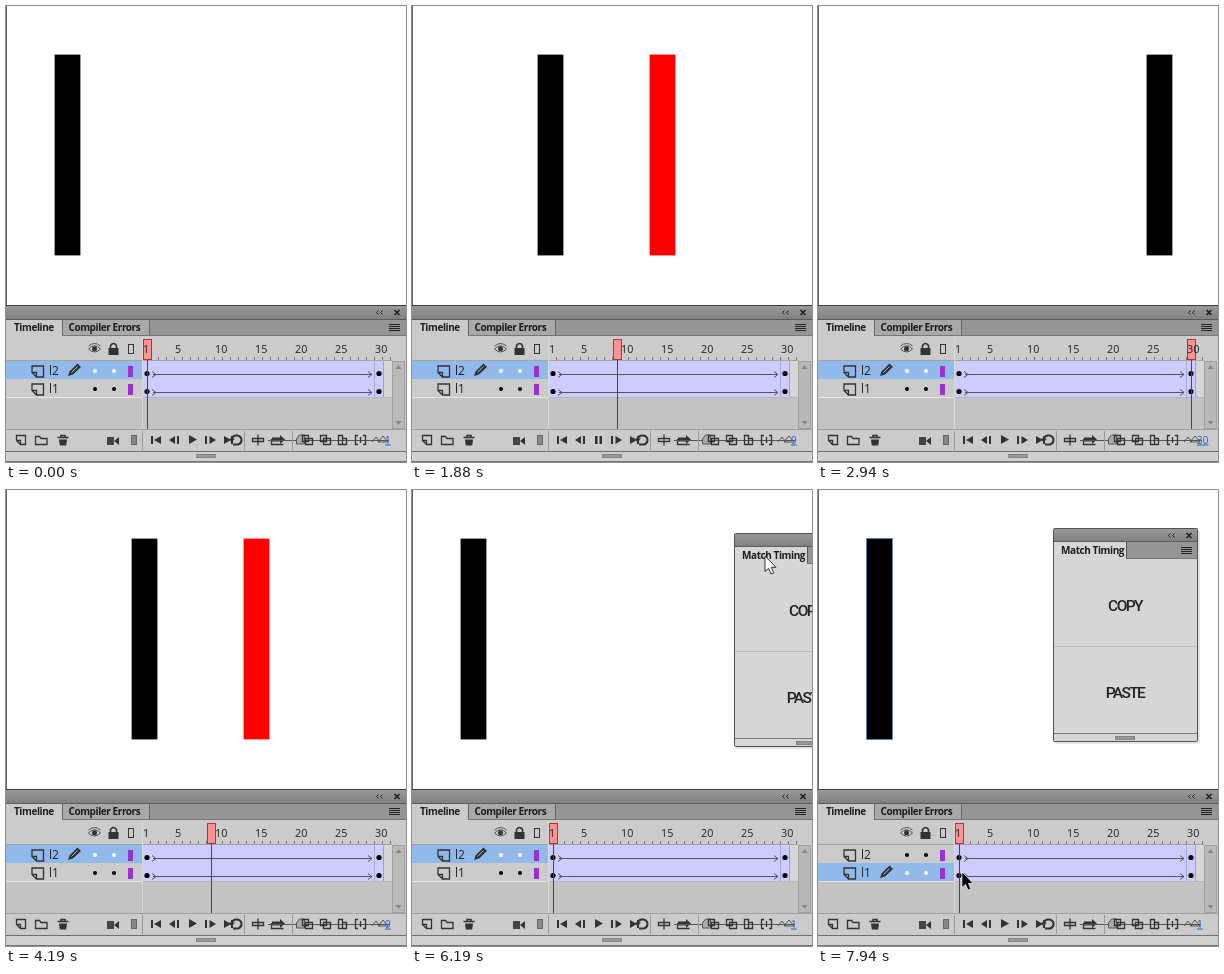
Recreate the animation shown at these times as an HTML page. Size 400 by 456 pixels, loop 8000 ms.

```html
<!DOCTYPE html>
<html lang="en">
<head>
<meta charset="utf-8">
<title>Timeline playback</title>
<style>
html, body { margin: 0; width: 100%; height: 100%; overflow: hidden; background: #fff; }
svg { display: block; width: 400px; height: 456px; }
text { font-family: "Open Sans", "Noto Sans", sans-serif; fill: #2c2c2c; }
.tab { font-size: 10px; font-weight: 700; letter-spacing: -.42px; fill: #1c1c1c; }
.num { font-family: "Noto Sans", sans-serif; font-size: 10.8px; }
.name { font-size: 12px; fill: #222; }
.fps { font-size: 10px; fill: #1668d8; text-decoration: underline; }
.big { font-family: Roboto, sans-serif; font-size: 15.5px; font-weight: 500; letter-spacing: -1.6px; text-anchor: middle; fill: #222; }
.ico { fill: none; stroke: #333; stroke-width: 1.3; }
.thin { fill: none; stroke: #555; stroke-width: 1; }
.solid { fill: #333; }
</style>
</head>
<body>
<svg id="stage" viewBox="0 0 400 456" xmlns="http://www.w3.org/2000/svg"></svg>
<script>
const LOOP = 8000, STEP = 62.5;
const ROWS = [355, 373];

const rect = (x, y, w, h, fill, more = '') =>
  `<rect x="${x}" y="${y}" width="${w}" height="${h}" fill="${fill}" ${more}/>`;
const path = (d, cls = 'ico', more = '') => `<path class="${cls}" d="${d}" ${more}/>`;
const dot = (x, y, r, fill = '#000', more = '') =>
  `<circle cx="${x}" cy="${y}" r="${r}" fill="${fill}" ${more}/>`;
const text = (x, y, cls, s, more = '') => `<text x="${x}" y="${y}" class="${cls}" ${more}>${s}</text>`;
const frameX = n => 141 + 8 * (n - 1);

// Collapse arrows, close cross and menu lines shared by both panels
const panelMarks = (right, top) =>
  path(`M${right - 27.5} ${top + 4.5}l-2 2 2 2M${right - 23.5} ${top + 4.5}l-2 2 2 2`, 'thin', 'style="stroke:#222"') +
  path(`M${right - 11.5} ${top + 4}l5 5m0 -5l-5 5`, 'ico', 'style="stroke:#222;stroke-width:1.7"') +
  [0, 2, 4, 6].map(d => rect(right - 17, top + 18 + d, 11, 1, '#222')).join('');

const grip = (x, y) => rect(x + .5, y + .5, 19, 3, '#999', 'stroke="#858585"');

function panelChrome() {
  return rect(0, 299, 400, 157, '#cbcbcb') +
    rect(0, 299, 400, 1, '#3c3c3c') +
    rect(0, 300, 400, 13, 'url(#bar)') +
    rect(0, 313, 400, 17, '#959595') + rect(0, 313, 400, 1, '#5c5c5c') +
    rect(57, 314, 86, 15, '#a9a9a9') + rect(143, 314, 1, 15, '#666') +
    rect(0, 329, 400, 1, '#777') +
    rect(0, 314, 56, 16, '#cbcbcb') + rect(56, 314, 1, 15, '#666') +
    text(8, 325, 'tab', 'Timeline') + text(62.5, 325, 'tab', 'Compiler Errors') +
    panelMarks(400, 300);
}

const columnIcons = path('M82.5 343q6 -6.5 12 0q-6 6 -12 0z', 'thin') + dot(88.5, 342.7, 2.5, '#333') +
  path('M82.5 340q6 -5 12 0', 'thin') +
  rect(102.5, 342, 10, 7, '#333') + path('M104.5 342v-2.5q3 -4 6 0v2.5', 'ico', 'style="stroke-width:1.6"') +
  rect(122.5, 338.5, 5, 9, 'none', 'stroke="#333"');

function ticks() {
  let s = '';
  for (let n = 1; n <= 31; n++) s += rect(frameX(n) + 3, 351, 1, 3, '#777');
  return s;
}

const labels = () => [1, 5, 10, 15, 20, 25, 30]
  .map(n => text(frameX(n) - 4, 347.3, 'num', n)).join('');

function layerRow(i) {
  const y = ROWS[i], line = y + 13.5, key = y + 12.5;
  return `<g id="row${i}">` + rect(0, y, 136, 18, '#cbcbcb', 'class="bg"') +
    path(`M26 ${y + 5}h11.5v11h-7l-4.5 -4.5zM26 ${y + 11.5}h4.5v4.5`) +
    text(43, y + 14, 'name', 'l' + (2 - i)) +
    `<g class="pen">` + path(`M62 ${y + 15}l1.5 -4.5 8 -8 3.5 3.5 -8 7.5z`, 'solid') +
    path(`M65.5 ${y + 11.5}l6 -6`, 'thin', 'style="stroke:#9bb8da"') + `</g>` +
    dot(89, y + 10, 2, '#000', 'class="mark"') + dot(108, y + 10, 2, '#000', 'class="mark"') +
    rect(122, y + 5, 5, 11, '#9a32cd') + `</g>` +
    rect(0, y + 18, 137, 1, '#e6e6e6') +
    rect(137, y, 241, 18, '#ccccff') + rect(137, y + 18, 249, 1, '#b4b4c8') +
    rect(378, y, 8, 18, '#d6d6d6') +
    rect(368, y, 1, 18, '#a8a8dc') + rect(377, y, 1, 18, '#a0a0c8') +
    path(`M147 ${line}H366M146 ${line - 3}l4 3 -4 3M362 ${line - 3}l4 3 -4 3`, 'thin') +
    dot(141, key, 2.6) + dot(373, key, 2.6);
}

function grid() {
  return rect(0, 354, 386, 1, '#a4a4a4') +
    rect(0, 392, 386, 31, '#c3c3c3') + layerRow(0) + layerRow(1) +
    rect(136, 331, 1, 92, '#d8d8d8') +
    rect(386.5, 355.5, 12, 67, '#b9b9b9', 'stroke="#a0a0a0"') +
    path('M389.5 363l3 -4 3 4zM389.5 415l3 4 3 -4z', '', 'fill="#888"') +
    rect(0, 423, 400, 1, '#a0a0a0');
}

function toolbar() {
  return rect(0, 424, 400, 21, '#cbcbcb') +
    path('M10.5 429.5h9v9h-5l-4 -4zM10.5 434.5h4v4') +
    path('M29.5 438.5v-8h4l1.5 2h6v6z') +
    path('M51.5 431.5h11M55 431v-1.5h4v1.5', 'ico', 'style="stroke-width:1.6"') +
    path('M53 433.5h8l-.8 6h-6.4z', 'solid') +
    rect(101, 431, 7, 8, '#444') + path('M108 435l5 -4v8z', 'solid') +
    rect(125.5, 429.5, 5, 9, '#888', 'stroke="#666"') +
    rect(136, 425, 1, 19, '#999') +
    rect(145, 430, 2, 8, '#333') + path('M155 430v8l-7 -4z', 'solid') +
    path('M169 430v8l-6 -4z', 'solid') + rect(171, 430, 2, 8, '#333') +
    `<g id="play">` + path('M183 429v9l8 -4.5z', 'solid') + `</g>` +
    `<g id="pause">` + rect(183, 430, 2.5, 8, '#333') + rect(187.5, 430, 2.5, 8, '#333') + `</g>` +
    rect(199, 430, 2, 8, '#333') + path('M203.5 430v8l6.5 -4z', 'solid') +
    path('M218 430v8l7 -4z', 'solid') + rect(225, 430, 2, 8, '#333') +
    path('M227 438.5h5q3.5 -1 3.5 -4.5t-4 -4.5h-2q-4 1 -4 5', 'ico', 'style="stroke-width:2"') +
    path('M223 432.5l2.5 4 3.5 -4z', 'solid') +
    rect(238, 425, 1, 19, '#999') +
    path('M252 428.5v11M246.5 432.5h11v3h-11z') +
    path('M266 431.5h8v-2.5l5 4.5 -5 4.5v-2.5h-8z', 'solid') +
    path('M265.5 433v5.5h12') + path('M262 434.5H383', 'thin') +
    rect(286, 425, 1, 19, '#999') +
    path('M290.5 438v-5l3 -4h5v9z', 'thin', 'style="fill:#aaa"') +
    path('M296.5 429.5h6v6h-6zM299.5 432.5h7v6h-7z') +
    path('M314.5 429.5h6v6h-6zM317.5 432.5h7v6h-7z') +
    path('M332.5 429.5h4v9h-4zM336.5 432.5h4v6h-4z') +
    path('M352 429.5h-2.5v9h2.5M357 429.5h2.5v9h-2.5M354.5 431v6') +
    path('M366 436l4 -5 4 5M372 436l5 -6 5 6z', 'thin') +
    text(379, 437.5, 'fps', '1', 'id="count"') +
    rect(0, 445, 400, 1, '#6e6e6e') + rect(0, 446, 400, 9, '#d0d0d0') + grip(190, 448) +
    rect(0, 455, 400, 1, '#777');
}

const playhead = `<g id="head">` + rect(-3.5, 333.5, 8, 20, '#ff9292', 'stroke="#b03434"') +
  rect(0, 354, 1, 69, '#c01414') + `</g>`;

const floating = `<g id="panel">` + rect(1, 2, 146, 214, '#000', 'opacity=".1" rx="2"') +
  rect(.5, .5, 144, 213, '#d6d6d6', 'stroke="#505050" rx="1"') +
  rect(1, 1, 143, 12, 'url(#bar)') + rect(1, 13, 143, 17, '#959595') +
  rect(1, 13, 143, 1, '#5c5c5c') + rect(1, 30, 143, 1, '#777') +
  rect(1, 14, 72, 17, '#d6d6d6') + rect(73, 14, 1, 16, '#555') +
  text(8, 26, 'tab', 'Match Timing') + panelMarks(145, 1) +
  rect(1, 118, 143, 1, '#bdbdbd') +
  text(72, 83, 'big', 'COPY') + text(72, 170, 'big', 'PASTE') +
  rect(1, 205, 143, 1, '#777') + grip(62, 208) + `</g>`;

const arrow = path('M0 0V15.5L3.6 12.3 6 18 8.7 16.8 6.3 11.3H11z', '', 'id="cursor" stroke-linejoin="round"');

// Bars reach slightly past whole pixels, which gives their soft grey rim
const bar = (id, fill) => rect(-.4, 48.6, 25.8, 200.8, fill, `id="${id}"`);

document.getElementById('stage').innerHTML =
  `<defs><linearGradient id="bar" x1="0" y1="0" x2="0" y2="1"><stop stop-color="#999"/><stop offset="1" stop-color="#808080"/></linearGradient></defs>` +
  rect(0, 0, 400, 456, '#fff') + bar('red', '#f00') + bar('black', '#000') +
  rect(0, 0, 1, 300, '#666') +
  panelChrome() + columnIcons + ticks() + grid() + toolbar() + playhead + labels() + floating + arrow;

const el = id => document.getElementById(id);
const move = (id, x, y) => el(id).setAttribute('transform', `translate(${x} ${y})`);
const show = (id, on) => el(id).setAttribute('visibility', on ? 'visible' : 'hidden');

// Smooth or straight interpolation through [step, value] pairs
function track(k, keys, smooth) {
  if (k <= keys[0][0]) return keys[0][1];
  for (let i = 1; i < keys.length; i++) {
    const [a, va] = keys[i - 1], [b, vb] = keys[i];
    if (k <= b) {
      let u = (k - a) / (b - a);
      if (smooth) u = u * u * (3 - 2 * u);
      return va + (vb - va) * u;
    }
  }
  return keys[keys.length - 1][1];
}

function frameAt(k) {
  if (k < 57) return Math.max(1, Math.min(30, Math.floor(9.75 + 1.25 * (k - 30))));
  return Math.round(track(k, [[56, 30], [69, 5], [81, 1]]));
}

function selectRow(active) {
  ROWS.forEach((_, i) => {
    const row = el('row' + i), on = i === active;
    row.querySelector('.bg').setAttribute('fill', on ? '#91b9ea' : '#cbcbcb');
    row.querySelector('.pen').setAttribute('visibility', on ? 'visible' : 'hidden');
    row.querySelectorAll('.mark').forEach(m => m.setAttribute('fill', on ? '#fff' : '#000'));
  });
}

const panelX = [[92, 403], [106, 241], [109, 235]];
const panelY = [[92, 46], [104, 41], [106, 39], [109, 38]];

function draw(time) {
  const k = Math.floor((time + 2.6) / STEP);
  const n = frameAt(k), u = (n - 1) / 29;
  move('black', Math.round(49 + 280 * u), 0);
  move('red', Math.round(49 + 280 * u * (5.7 + u * (9.79 * u - 14.49))), 0);
  show('red', n > 1 && n < 30);
  move('head', frameX(n), 0);
  el('count').textContent = n;

  const playing = k >= 23 && k < 47;
  show('play', !playing);
  show('pause', playing);

  const picked = k >= 122;
  selectRow(picked ? 1 : 0);
  el('black').setAttribute('stroke', picked ? '#3d78b8' : 'none');
  el('black').setAttribute('stroke-width', .6);

  const px = Math.round(track(k, panelX, true)), py = Math.round(track(k, panelY));
  show('panel', k >= 93);
  move('panel', px, py);

  show('cursor', k >= 93);
  const free = k > 109, dark = k >= 116;
  move('cursor',
    free ? track(k, [[109, 266], [118, 146], [120, 146], [124, 144]], true) : px + 31,
    free ? track(k, [[109, 61], [118, 399], [120, 399], [124, 382]], true) : py + 23);
  el('cursor').setAttribute('fill', dark ? '#000' : '#fff');
  el('cursor').setAttribute('stroke', dark ? '#fff' : '#333');
  el('cursor').setAttribute('stroke-width', dark ? .6 : 1);
}

const start = performance.now();
function tick() {
  draw((performance.now() - start) % LOOP);
  requestAnimationFrame(tick);
}
draw(0);
requestAnimationFrame(tick);
</script>
</body>
</html>
```
